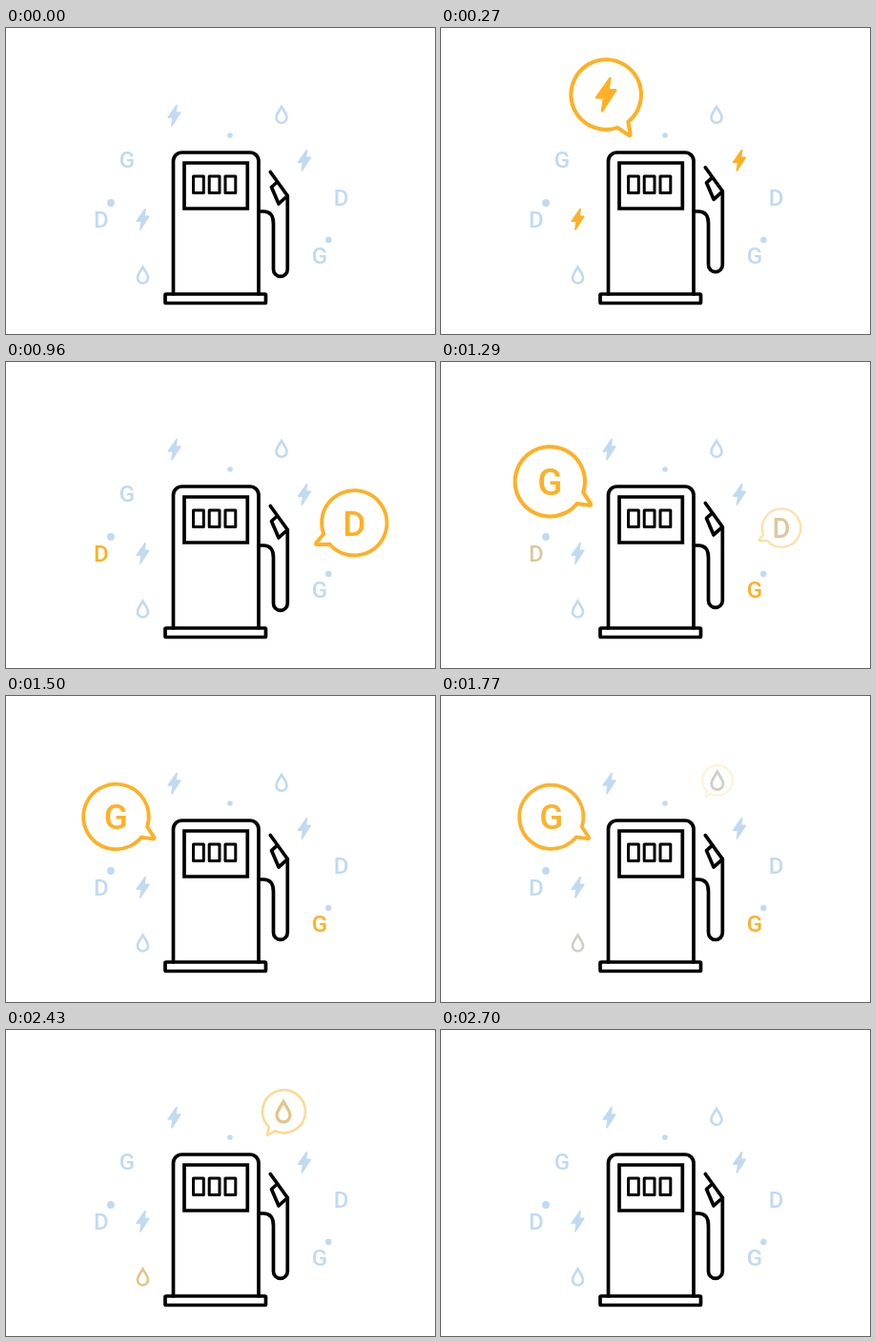
An HTML page for the animation above (3180 ms loop, 450 by 322 pixels).

```html
<!DOCTYPE html>
<html lang="en">
<head>
<meta charset="utf-8">
<title>Fuel pump</title>
<style>
  html, body { margin: 0; width: 100%; height: 100%; overflow: hidden; background: #fff; }
  svg { display: block; width: 100%; height: 100%; }
  text { font: 500 37px Roboto, sans-serif; text-anchor: middle; }
  .line { fill: none; stroke: #000; stroke-width: 3.7; stroke-linecap: round; stroke-linejoin: round; }
</style>
</head>
<body>
<svg viewBox="0 0 450 322">
  <g fill="#c1daf1">
    <circle cx="110" cy="184" r="3.9"/>
    <circle cx="235" cy="113" r="2.8"/>
    <circle cx="338.3" cy="223" r="3.2"/>
  </g>
  <g class="line">
    <path d="M175.5 280V140a9 9 0 0 1 9-9h71.500a9 9 0 0 1 9 9V280"/>
    <rect x="167" y="280" width="105.500" height="9.500" rx="1"/>
    <path d="M187 142h66.300v48h-66.300z" style="stroke-linejoin:miter"/>
    <path d="M196.500 156h10.800v17.500h-10.800zM213.200 156h10.800v17.500h-10.800zM230 156h10.800v17.500h-10.800z" stroke-width="3" style="stroke-width:3"/>
    <path id="hose"/>
    <path id="nozzle" d="M277.300 151.500L295.300 176.500L286 185L278.500 167.500L284 162.500"/>
  </g>
  <g id="icons"></g>
</svg>
<script>
const LOOP = 3180, FADE = 360, POP = 350;
const BLUE = [193, 218, 241], ORANGE = [255, 176, 36];
const SMALL = 0.65;     // idle icon scale
const RADIUS = 34.2;

const GLYPHS = {
  bolt: '<path d="M4 -16.500L-9.700 3H-2L-4 16.500L9.700 -4.500H2Z" fill="currentColor" stroke="currentColor" stroke-width="2.500" stroke-linejoin="round"/>',
  drop: '<path d="M0 -12.500C3 -7 8.500 -1 8.500 5A8.500 8.500 0 0 1 -8.500 5C-8.500 -1 -3 -7 0 -12.500Z" fill="none" stroke="currentColor" stroke-width="4"/>',
  D: '<text y="13.200" fill="currentColor">D</text>',
  G: '<text y="13.200" fill="currentColor">G</text>'
};

// from: idle place, to: bubble centre, tail: angles of its two feet and its tip
const topics = [
  { glyph: 'bolt', start: 15, end: 617, from: [176.5, 92], to: [173.5, 72.3], tail: [71, 59.5, 51], twins: [[143.5, 201.3], [313, 139.3]] },
  { glyph: 'D', start: 617, end: 1165, from: [351.7, 178], to: [365.3, 169.3], tail: [160, 151, 139], twins: [[99.8, 201]] },
  { glyph: 'G', start: 1165, end: 1757, from: [127, 138], to: [115.5, 127], tail: [39, 30, 18], twins: [[329, 239.5]] },
  { glyph: 'drop', start: 1757, end: 2325, from: [289, 91], to: [294, 80.3], glyphShift: -1, tail: [134, 125, 115], twins: [[143.5, 259.7]] }
];

const clamp = x => Math.min(1, Math.max(0, x));
const mix = (a, b, p) => a + (b - a) * p;

// cubic-bezier(.25, .1, .25, 1)
function ease(x) {
  x = clamp(x);
  const curve = (a, b, s) => 3 * a * s * (1 - s) ** 2 + 3 * b * s * s * (1 - s) + s ** 3;
  let low = 0, high = 1;
  for (let i = 0; i < 18; i++) {
    const mid = (low + high) / 2;
    if (curve(0.25, 0.25, mid) < x) low = mid; else high = mid;
  }
  return curve(0.1, 1, low);
}

function overshoot(x) {
  const k = 2.5, u = clamp(x) - 1;
  return 1 + (k + 1) * u ** 3 + k * u * u;
}

function bubblePath([left, tip, right]) {
  const polar = (angle, r) => [Math.cos(angle * Math.PI / 180) * r, Math.sin(angle * Math.PI / 180) * r];
  const a = polar(left, RADIUS), b = polar(right, RADIUS), peak = polar(tip, 47.5);
  const toward = p => p.map((v, i) => mix(v, peak[i], 0.8));
  return `M${a}A${RADIUS} ${RADIUS} 0 1 1 ${b}L${toward(b)}Q${peak} ${toward(a)}Z`;
}

const icons = document.getElementById('icons');
function addGroup(content) {
  const group = document.createElementNS('http://www.w3.org/2000/svg', 'g');
  group.innerHTML = content;
  return icons.appendChild(group);
}
const place = (el, x, y, scale) => el.setAttribute('transform', `translate(${x} ${y}) scale(${scale})`);

for (const topic of topics) {
  topic.bubble = addGroup(`<path d="${bubblePath(topic.tail)}" fill="none" stroke="rgb(${ORANGE})" stroke-width="3.800" stroke-linejoin="round"/>`);
  topic.main = addGroup(GLYPHS[topic.glyph]);
  topic.copies = topic.twins.map(([x, y]) => {
    const copy = addGroup(GLYPHS[topic.glyph]);
    place(copy, x, y, SMALL);
    return copy;
  });
}

function drawTopic(topic, t) {
  const { start, end, from, to, glyphShift = 0 } = topic;
  const p = t < start ? 0 : t < end ? overshoot((t - start) / POP) : 1 - ease((t - end) / FADE);
  const x = mix(from[0], to[0], p), y = mix(from[1], to[1], p);
  place(topic.bubble, x, y, mix(0.32, 1, p));
  topic.bubble.setAttribute('opacity', clamp(p));
  place(topic.main, x + glyphShift * p, y, mix(SMALL, 1, p));
  const color = `rgb(${BLUE.map((v, i) => Math.round(mix(v, ORANGE[i], clamp(p))))})`;
  for (const el of [topic.main, ...topic.copies]) el.style.color = color;
}

function drawHose(t) {
  const lift = topics.reduce((sum, { start }, i) => sum + (i % 2 ? -1 : 1) * ease((t - start) / FADE), 0);
  const dy = -5 * lift;
  document.getElementById('hose').setAttribute('d',
    `M265 193H270Q280.500 193 280.500 206V${254 + dy}a7.400 7.400 0 0 0 14.800 0V${176.5 + dy}`);
  document.getElementById('nozzle').setAttribute('transform', `translate(0 ${dy})`);
}

function frame() {
  const t = performance.now() % LOOP;
  topics.forEach(topic => drawTopic(topic, t));
  drawHose(t);
  requestAnimationFrame(frame);
}
frame();
</script>
</body>
</html>
```
